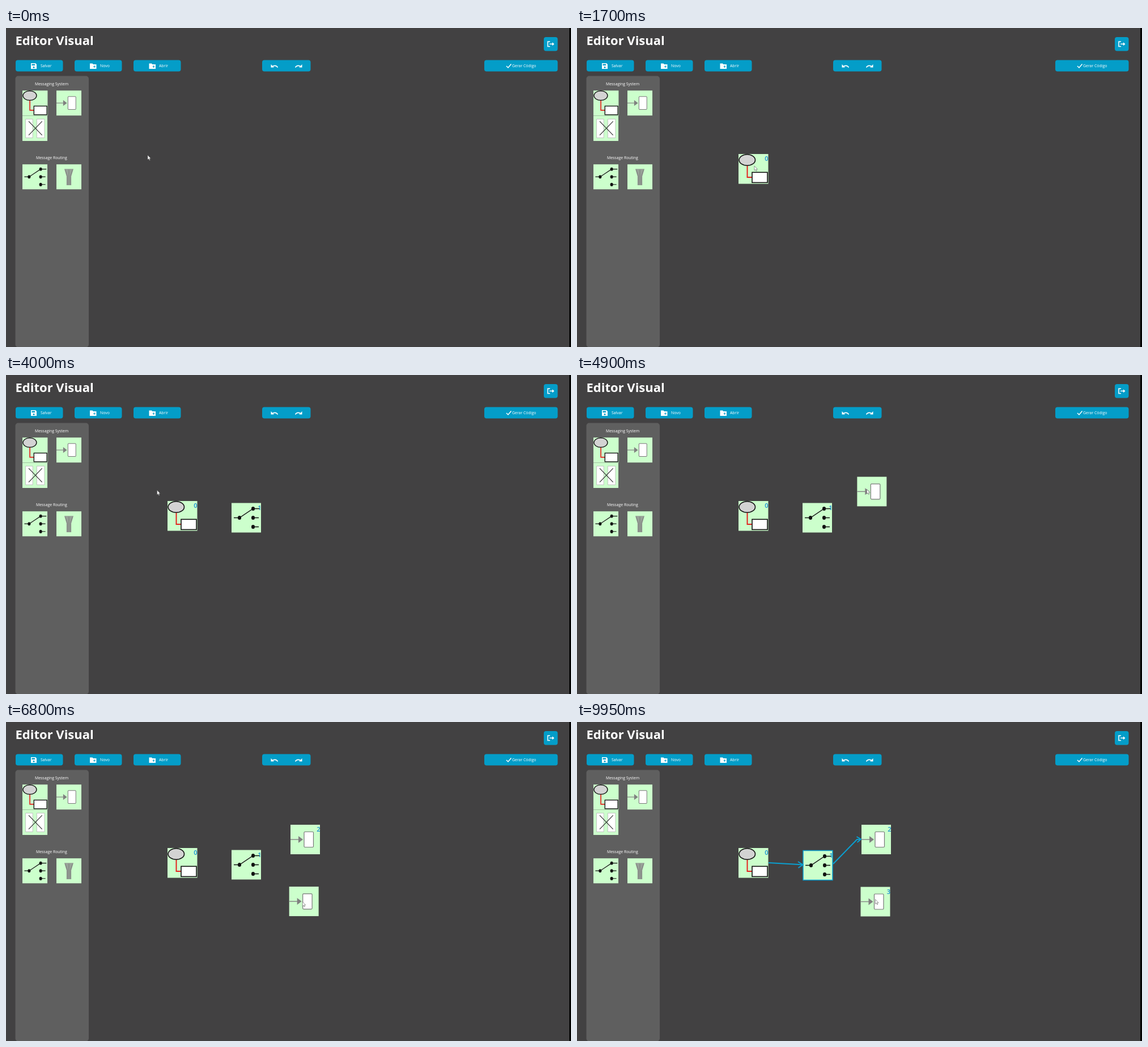
An HTML page for the animation above (10000 ms loop, 997 by 562 pixels).

```html
<!DOCTYPE html>
<html lang="pt">
<head>
<meta charset="utf-8">
<title>Editor Visual</title>
<style>
  html, body { margin: 0; width: 100%; height: 100%; overflow: hidden; background: #424142; }
  svg { display: block; width: 997px; height: 562px; }
  text { font: 6.9px "Open Sans", "Noto Sans", sans-serif; fill: #fff; }
  .title { font-size: 22px; font-weight: 700; }
  .num { font-size: 11px; font-weight: 600; fill: #168fd2; text-anchor: end; }
  .btn { fill: #049dc8; }
  .icon { fill: none; stroke: #fff; stroke-width: 1.5; }
  .link { fill: none; stroke: #0a9fd0; stroke-width: 2; }
  .frame { fill: none; stroke: #0a9fd0; stroke-width: 1.5; }
  .tile { fill: #cfc; }
</style>
</head>
<body>
<svg viewBox="0 0 997 562">
  <defs>
    <g id="endpoint">
      <rect class="tile" width="52.5" height="52.5"/>
      <path fill="none" stroke="#e3231e" stroke-width="2" d="M15.5 20v21H24"/>
      <g stroke="#111" stroke-width="1.6">
        <ellipse cx="15.3" cy="10.5" rx="14.2" ry="9.8" fill="#d3d3d3"/>
        <rect x="24" y="32.3" width="27" height="18" fill="#fff"/>
      </g>
    </g>
    <g id="channel">
      <rect class="tile" width="52" height="52"/>
      <path stroke="#888" stroke-width="1.5" d="M0 26h15"/>
      <path fill="#808080" d="M14 20l8 6-8 6z"/>
      <rect x="24" y="12.5" width="16.5" height="27" rx="1.5" fill="#fff" stroke="#777" stroke-width="1.2"/>
    </g>
    <g id="router">
      <rect class="tile" width="52" height="52"/>
      <g fill="none" stroke="#111">
        <path stroke-width="1.4" d="M4 26h10L38 10h12M38 26h10M38 42h10"/>
        <path stroke-width="6" stroke-linecap="round" d="M14 25.500v1M38 9.500v1M38 25.500v1M38 41.500v1"/>
      </g>
    </g>
    <g id="translator">
      <rect class="tile" width="52" height="52"/>
      <path fill="#fff" stroke="#bbb" d="M6.5 6.5h15v39h-15zM30 6.5h16v39H30z"/>
      <path stroke="#333" stroke-width="1.4" d="M13 11l28 29M41 11L13 40"/>
    </g>
    <g id="filter">
      <rect class="tile" width="52" height="52"/>
      <path fill="#98a298" d="M16.5 9.5h19L31 25v18.500H21V25z"/>
      <path fill="none" stroke="#777" d="M18 11l5 14v18M34 11l-5 14v18M26 11v32"/>
    </g>
    <g id="folder">
      <path fill="#fff" d="M0 0h4.500l1.500 1.500h5.500v8H0z"/>
      <path stroke="#049dc8" d="M8 3.500v4M6 5.500h4"/>
    </g>
    <g id="turn">
      <path class="icon" d="M3 3.500q6-3 9 2"/>
      <path fill="#fff" d="M0 0v5.500h5.500z"/>
    </g>
  </defs>

  <rect width="997" height="562" fill="#424142"/>
  <rect x="994" width="3" height="562"/>
  <text class="title" x="16.5" y="30">Editor Visual</text>

  <g id="buttons"></g>
  <rect class="btn" x="949" y="16" width="24.500" height="24.500" rx="4"/>
  <path fill="#fff" d="M44 62h8l2 2v8H44z"/>
  <path class="btn" d="M45.500 63.500h5.500v2.500h-5.500z"/>
  <circle class="btn" cx="49" cy="69.300" r="1.500"/>
  <use href="#folder" x="148" y="62.500"/>
  <use href="#folder" x="252.500" y="62.500"/>
  <use href="#turn" x="467.500" y="64"/>
  <use href="#turn" transform="translate(522.500 64) scale(-1 1)"/>
  <path class="icon" d="M883 67l3 3 5.500-6.500"/>
  <path class="icon" d="M960 24h-4v8.500h4M959 28.200h7M964 26l2.300 2.200-2.300 2.200"/>

  <rect x="16.500" y="84.500" width="129.500" height="478" rx="5" fill="#5f5f5f"/>
  <text x="51" y="100.500">Messaging System</text>
  <text x="53" y="230.500">Message Routing</text>
  <g id="palette"></g>
  <g id="nodes"></g>
  <path class="link" d="M338 248l53 3 7.500.5M390 246l8.500 5.500-8 5.500"/>
  <path class="link" d="M452 250l42-43 7-.5M493.500 202l7.500 4.500-6.500 5.500"/>
  <path id="cursor" fill="#fff" stroke="#555" stroke-width=".6" d="M0 0v8l1.800-1.600 1.300 2.800 1.300-.6-1.300-2.700h2.400z"/>
</svg>
<script>
const LOOP = 10000, STEP = 50;
const byId = id => document.getElementById(id);
const show = (el, on) => el.style.display = on ? "" : "none";
const move = (el, x, y) => el.setAttribute("transform", `translate(${x} ${y})`);

// x, width, label, label x
const buttons = [
  [17, 83.5, "Salvar", 61], [121, 83.5, "Novo", 166], [225, 83.5, "Abrir", 270],
  [452, 85.5, "", 0], [844, 129.5, "Gerar Código", 893]
];
byId("buttons").innerHTML = buttons.map(([x, w, label, lx]) =>
  `<rect class="btn" x="${x}" y="56.5" width="${w}" height="20" rx="4"/><text x="${lx}" y="69">${label}</text>`).join("");

const rows = [["endpoint", "channel"], ["translator"], ["router", "filter"]];
const rowTop = [110.2, 155, 240.2];
const home = {};
rows.forEach((row, r) => row.forEach((kind, c) => home[kind] = [29 + 60 * c, rowTop[r]]));
byId("palette").innerHTML = Object.entries(home).map(([kind, [x, y]]) =>
  `<use href="#${kind}" transform="translate(${x} ${y}) scale(.846)"/>`).join("");

// seek and drag are [start, end]; grab is the cursor's place in the tile
const nodes = [
  { kind: "endpoint", seek: [50, 600], drag: [900, 1700], at: [285, 222], grab: [28, 21] },
  { kind: "router", seek: [1900, 2850], drag: [2940, 3520], at: [398, 225.5], grab: [36, 9] },
  { kind: "channel", seek: [3850, 4290], drag: [4400, 4970], at: [502, 181], grab: [17, 22] },
  { kind: "channel", seek: [5100, 5750], drag: [5850, 6840], at: [500.5, 290.5], grab: [23.5, 26.5] }
];
const visits = [[0, 7000, 8000], [1, 8350, 8600], [2, 8850, 9150], [1, 9300, 9500], [3, 9600, 9950]];
// A link appears when its selection ends
const selections = [[0, 8250, 8650], [1, 8750, 9200], [1, 9550, LOOP]];
const links = document.querySelectorAll(".link");

byId("nodes").innerHTML = nodes.map((n, i) =>
  `<g><use href="#${n.kind}"/><text class="num" x="52.5" y="12.3">${i}</text>` +
  `<rect class="frame" width="52" height="52"/></g>`).join("");

// lag makes y trail x, bending the path
const add = (a, b) => [a[0] + b[0], a[1] + b[1]];
const moves = [
  ...nodes.flatMap(n => [
    { span: n.seek, to: add(home[n.kind], n.grab), lag: 1.75 },
    { span: n.drag, to: add(n.at, n.grab), lag: 1.27 }
  ]),
  ...visits.map(([i, ...span]) => ({ span, to: add(nodes[i].at, [26, 22]), lag: 1 }))
];

function cursorAt(t) {
  let [x, y] = [250, 224];
  for (const { span: [from, end], to, lag } of moves) {
    if (t < from) break;
    const e = Math.sin(Math.PI / 2 * Math.min(1, (t - from) / (end - from)));
    x += (to[0] - x) * e;
    y += (to[1] - y) * e ** lag;
  }
  return [x, y];
}

function draw(t) {
  const [cx, cy] = cursorAt(t);
  move(byId("cursor"), cx, cy);
  nodes.forEach(({ drag, at, grab }, i) => {
    const el = byId("nodes").children[i];
    const [, num, frame] = el.children;
    const dropped = t >= drag[1];
    const picked = selections.some(([k, from, to]) => k === i && t >= from && t < to);
    show(el, t >= drag[0]);
    show(num, dropped);
    show(frame, picked);
    if (dropped) move(el, at[0] + picked, at[1] + picked);
    else move(el, cx - grab[0], cy - grab[1]);
  });
  links.forEach((el, i) => show(el, t >= selections[i][2]));
}

const start = performance.now();
function tick(now) {
  const t = Math.max(0, now - start) % LOOP;
  draw(Math.floor(t / STEP) * STEP);
  requestAnimationFrame(tick);
}
tick(start);
</script>
</body>
</html>
```
